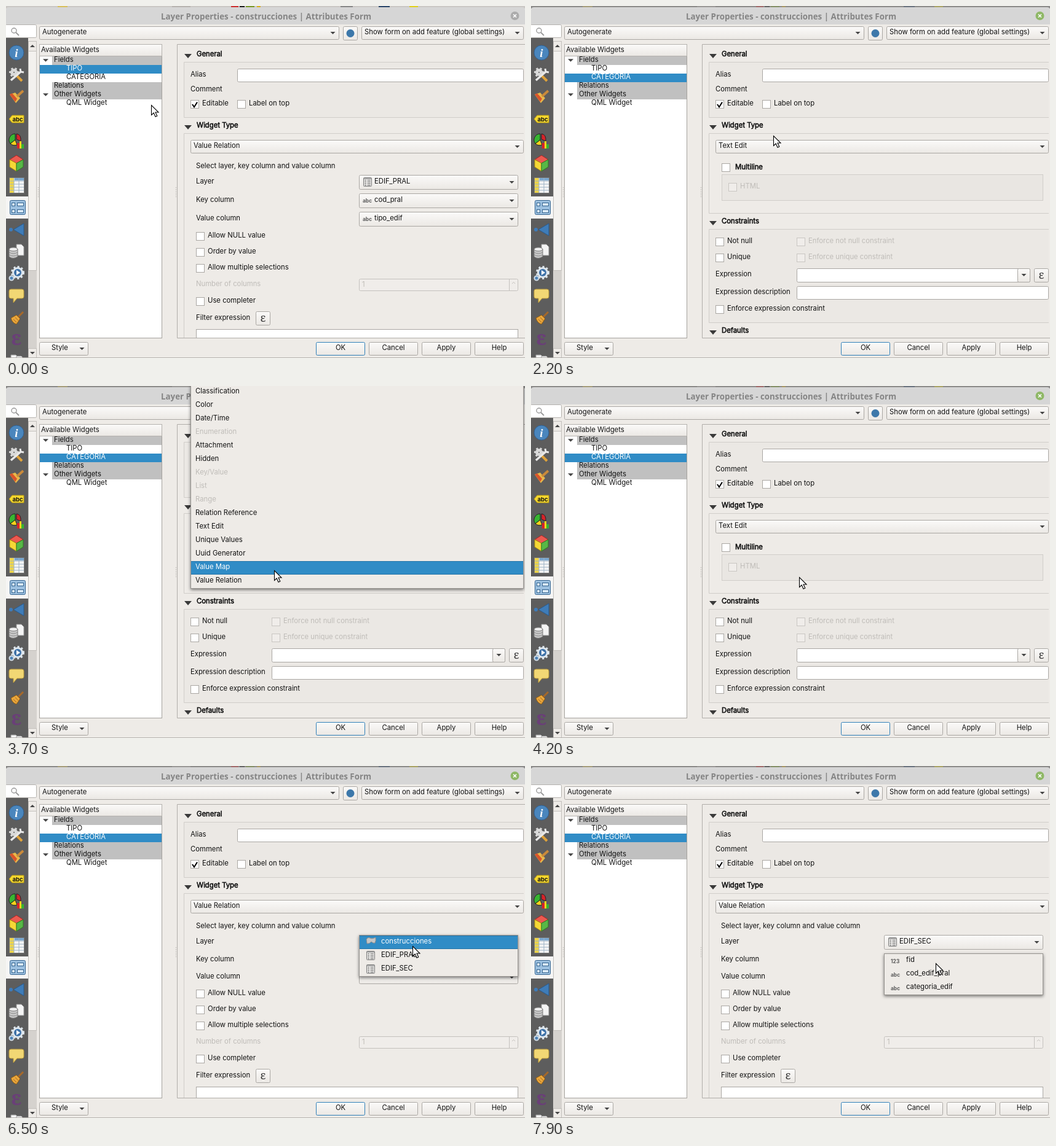
Write an HTML page that moves like this. It is 844 px wide and 573 px high and loops after 8000 ms.

```html
<!DOCTYPE html>
<html lang="en">
<head>
<meta charset="utf-8">
<title>Layer Properties</title>
<style>
  html, body { margin: 0; width: 100%; height: 100%; overflow: hidden; background: #eeebe7; }
  svg { display: block; width: 100vw; height: 100vh; }
  text { font: 11.3px Inter, sans-serif; fill: #111; white-space: pre; }
  .title { font: bold 13.33px "Noto Sans", sans-serif; fill: #858585; }
  .bold { stroke: #111; stroke-width: .55px; }
  .off { fill: #bfbcb8; }
  .sel { fill: #fff; }
  .mid { text-anchor: middle; }
  .type { font: bold 8.4px Inter, sans-serif; fill: #5c5c5c; }
  .eps { font: 18px "Noto Serif", serif; fill: #333; text-anchor: middle; }
  .item > .bar { visibility: hidden; }
  .item.on > .bar { visibility: visible; }
  .item.on > text { fill: #fff; }
  .menu { filter: drop-shadow(0 2px 2.5px rgba(0, 0, 0, .5)); }
</style>
</head>
<body>
<svg id="stage" viewBox="0 0 844 573" xmlns="http://www.w3.org/2000/svg"></svg>
<script>
const EDGE = '#aaa7a3', BLUE = '#308cc6', BG = '#eeebe7';

// Drawing helpers; text is placed by the vertical centre of its capitals.
const fill = (x, y, w, h, color, extra = '') =>
  `<rect x="${x}" y="${y}" width="${w}" height="${h}" fill="${color}" ${extra}/>`;
const box = (x, y, w, h, color = '#fff', edge = EDGE, r = 0) =>
  fill(x + .5, y + .5, w - 1, h - 1, color, `stroke="${edge}" rx="${r}"`);
const label = (x, y, s, cls = '') => `<text x="${x}" y="${y + 4}" class="${cls}">${s}</text>`;
const path = (d, color, extra = '') => `<path d="${d}" fill="${color}" ${extra}/>`;
const stroke = (d, color, w = 1) => path(d, 'none', `stroke="${color}" stroke-width="${w}"`);
const disc = (x, y, r, color, extra = '') => `<circle cx="${x}" cy="${y}" r="${r}" fill="${color}" ${extra}/>`;
const group = (id, body, extra = '') => `<g id="${id}" ${extra}>${body}</g>`;
const at = (x, y, body) => `<g transform="translate(${x} ${y})">${body}</g>`;
const arrow = (x, y, s = 4) => path(`M${x - s} ${y - s / 2}h${2 * s}l${-s} ${s}z`, '#444');

const button = (x, y, w, h, s = '', edge = EDGE) =>
  box(x, y, w, h, 'url(#face)', edge, 2) + label(x + w / 2, y + 9, s, 'mid');
const combo = (x, y, w, h, s = '', tx = x + 5) =>
  box(x, y, w, h, 'url(#face)', EDGE, 2) + label(tx, y + 9, s) + arrow(x + w - 10.5, y + h / 2);
const check = (x, y, s, cls = '') =>
  box(x, y, 14, 14, cls === 'off' ? '#f0edea' : '#fff', cls === 'off' ? '#c9c6c2' : '#aba8a4') +
  label(x + (x === 310 ? 22 : 19), y + 5, s, cls);
const section = (y, s, h) =>
  path(`M290 ${y}h12l-6 7z`, '#3a3a3a') + label(310, y - .5, s, 'bold') +
  (h ? path(`M844 ${y + 13.5}H289.5v${h}H844`, 'rgba(0,0,0,.012)', 'stroke="#d0cdc9"') : '');
const epsButton = (x, y) => button(x, y, 24, 23) + label(x + 12, y + 12.5, 'ε', 'eps');

const tableIcon = (x, y) => {
  let s = box(x, y, 14, 15, '#f2f1ef', '#777', 1) + fill(x + 1, y + 1, 12, 2, '#aaa');
  for (let i = 0; i < 4; i++) s += stroke(`M${x + 2} ${y + 4.5 + i * 2.7}h3m1.5 0h5.5`, '#777', 1.2);
  return s;
};
const landIcon = (x, y) =>
  path(`M${x} ${y + 3}q3-4 6-2t9-1q1 5-1 9-3 1-6-2-3 4-7 3z`, '#c6c6c6', 'stroke="#8c8c8c"');
const typeIcon = s => (x, y) => label(x - 1, y + 7.5, s, 'type');

const menu = (id, x, y, w, items) => {
  const rows = items.map(([s, icon, cls], i) => {
    const top = y + 1 + i * 22;
    return `<g class="item">${fill(x + 1, top, w - 2, 22, '#2675a8', 'class="bar"')}` +
      fill(x + 1, top + 1, w - 2, 20, BLUE, 'class="bar"') +
      (icon ? icon(x + 12, top + 3) : '') + label(icon ? x + 36 : x + 8, top + 9, s, cls) + '</g>';
  });
  return group(id, box(x, y, w, items.length * 22 + 2, BG, '#96938f') + rows.join(''), 'class="menu"');
};

// Form for a value relation; the tall version has taller key and value combos.
const relationForm = tall => {
  const d = tall ? 0 : -4, h = tall ? 24 : 22;
  const key = tall ? 315 : 314, val = tall ? 345 : 342;
  const keyTop = 305, valTop = tall ? 335 : 333;
  let s = combo(300, 218, 542, 22, 'Value Relation') +
    label(309, 260, 'Select layer, key column and value column') +
    label(309, 285, 'Layer') + label(309, key, 'Key column') + label(309, val, 'Value column') +
    combo(574, 275, 259, 24) + combo(574, keyTop, 259, h) + combo(574, valTop, 259, h);
  if (tall) s += tableIcon(581, 279) + label(599, 285, 'EDIF_PRAL') +
    label(580, 316, 'abc', 'type') + label(599, 315, 'cod_pral') +
    label(580, 346, 'abc', 'type') + label(599, 345, 'tipo_edif');
  const options = [['Allow NULL value', 368], ['Order by value', 394],
    ['Allow multiple selections', 420], ['Use completer', 474]];
  s += options.map(([name, y]) => check(309, y + d, name)).join('') +
    label(309, 452 + d, 'Number of columns', 'off') +
    box(574, 444 + d, 259, 20, '#f0edea', '#c4c1bd', 2) + label(579, 453 + d, '1', 'off') +
    stroke(`M818.5 ${444 + d}v20`, '#c4c1bd') + stroke(`M823 ${452 + d}l2.5-2.5 2.5 2.5`, '#c4c1bd') +
    label(309, 507 + d, 'Filter expression') + epsButton(406, 497 + d) + box(309, 526 + d, 524, 60);
  return path('M844 207.5H289.5V560', 'none', 'stroke="#d0cdc9"') + s;
};

const textForm = () =>
  path('M844 207.5H289.5V337.5H844', 'none', 'stroke="#d0cdc9"') +
  combo(300, 218, 542, 22, 'Text Edit') +
  check(310, 256, '') + label(332, 262, 'Multiline', 'bold') +
  box(310, 274, 523, 43, '#e9e6e2', '#d0cdc9') + check(321, 288, 'HTML', 'off') +
  section(350, 'Constraints', 152) +
  check(300, 377, 'Not null') + check(432, 377, 'Enforce not null constraint', 'off') +
  check(300, 403, 'Unique') + check(432, 403, 'Enforce unique constraint', 'off') +
  label(300, 436, 'Expression') + box(432, 427, 380, 23, '#fff', EDGE, 2) +
  box(791, 427, 21, 23, 'url(#face)', EDGE, 2) + arrow(801.5, 438) + epsButton(818, 427) +
  label(300, 465, 'Expression description') + box(432, 456, 410, 22, '#fff', EDGE, 2) +
  check(300, 487, 'Enforce expression constraint') + section(528, 'Defaults', 0);

const broom = (head, rod) =>
  stroke('M1 0L11-10', rod, 3) + path('M-9 0L0-5 6 1 0 10Q-7 8-9 0z', head, 'stroke="#8a5a14"') +
  stroke('M-5 2l5 5M-2-1l5 5', '#a66a1c');
const sheet = path('M0-12h8l4 4V6H0z', '#f4f4f4', 'stroke="#999"');
const gear = (r, color) => disc(0, 0, r, '#fff0', `stroke="${color}" stroke-width="5"`) +
  disc(0, 0, r + 3, 'none', `stroke="${color}" stroke-width="3" stroke-dasharray="3 3.3"`);

const sidebar = () => {
  const icons = [
    [76, disc(0, 0, 12, '#4a86bd', 'stroke="#2f5f90"') +
      `<text x="0" y="6.5" class="mid" style="font:italic bold 19px 'Liberation Serif',serif;fill:#fff">i</text>`],
    [112, at(-4, -4, gear(3.5, '#d9d9d9')) + stroke('M-1 0L9 10', '#e0a33a', 4) +
      stroke('M-9 9L8-6', '#e8e8e8', 3.5) + stroke('M6-10l1 5 5 1', '#e8e8e8', 3)],
    [148, path('M-11-4L-2-7 6 2-1 10z', '#e8b84a') + path('M-11-4l4-2 8 9-3 5z', '#d9542b') +
      stroke('M1-1L11-10', '#c98a3a', 4)],
    [184, path('M-12 0l5-6H12V6H-7z', '#f7d92f', 'stroke="#b89a13"') +
      `<text x="2" y="3.5" class="mid" style="font:bold 9.5px Inter,sans-serif">abc</text>`],
    [220, path('M-2-2V-12A10 10 0 0 0-10 4z', '#37b531', 'stroke="#222"') +
      path('M-2-2L-10 4A10 9 0 0 0 1 6z', '#f2d21c', 'stroke="#222"') +
      path('M0-3V-12Q8-11 7 0z', '#d8232a', 'stroke="#222"') +
      fill(1, 3, 4, 9, '#d8232a') + fill(5, 0, 3, 12, '#f2d21c') + fill(8, 5, 4, 7, '#37b531')],
    [256, path('M0-13L11-6 0 0-11-6z', '#eb5a50', 'stroke="#a22"') +
      path('M-11-6L0 0V13L-11 6z', '#f4d836', 'stroke="#a58a10"') +
      path('M11-6L0 0V13L11 6z', '#57b847', 'stroke="#2f7a22"')],
    [292, box(-12, -13, 25, 26, '#f5f5f5', '#777') + fill(-11, -12, 7, 24, '#f0d648') +
      fill(-3, -12, 15, 4, '#7aa7cf') + stroke('M-11-7H12M-11-2H12M-11 3H12M-11 8H12M-4-12V12M4-12V12', '#9fb4c6')],
    [328, box(-11, -12, 26, 24, '#9cc0e0', '#35648f', 2) +
      [[-8, -8], [-8, 3]].map(([x, y]) => box(x, y, 6, 6, '#d8e8f5', '#35648f') +
        box(x + 9, y, 11, 6, '#d8e8f5', '#35648f')).join('')],
    [364, path('M-5 0L12-10V10z', '#3f7cb8', 'stroke="#2a5a8c"') + disc(-9, 0, 3, '#3f7cb8')],
    [400, at(0, 0, sheet) + path('M-12-4v12q6 5 14 0V-4z', '#c9c9c9', 'stroke="#777"') +
      '<ellipse cx="-5" cy="-4" rx="7" ry="3" fill="#eee" stroke="#777"/>' + stroke('M-12 1q7 4 14 0M-12 5q7 4 14 0', '#888')],
    [436, at(2, -2, gear(6.5, '#dfe7ee') + disc(0, 0, 6, '#3f72a8') + path('M-2-4L4 0-2 4z', '#fff')) +
      at(-8, 7, disc(0, 0, 3.5, '#4f84b8', 'stroke="#cfdbe6" stroke-width="2"'))],
    [470, path('M-9-9H9q3 0 3 3V3q0 3-3 3H1L-5 13V6H-9q-3 0-3-3V-6q0-3 3-3z', '#f2d774', 'stroke="#b8983a"')],
    [508, broom('#e9a63c', '#a5682a')],
    [543, `<text y="9" class="mid" style="font:bold 32px 'Noto Serif',serif;fill:#6a3f78">ε</text>`],
    [578, at(-9, 2, sheet) + at(0, 4, sheet)]
  ];
  return fill(0, 52, 36, 521, '#5d5d5d') + fill(0, 310, 36, 36, '#f6f5f4') +
    icons.map(([y, s]) => at(17, y, s)).join('');
};

const specks = [[84, 16, '#d8c060'], [270, 30, '#b8b4b0'], [366, 12, '#c33'], [380, 8, '#222'], [390, 14, '#7a9a2a'],
  [408, 6, '#d8b020'], [544, 20, '#8a8a8a'], [606, 18, '#2f4a6c'], [656, 14, '#e0d020']];
const strip = (bg, alpha) => fill(0, 0, 844, 4, bg) +
  specks.map(([x, w, c]) => fill(x, 0, w, 2, c, `opacity="${alpha}"`)).join('');
const closeButton = color => disc(827.5, 16, 7, color) + stroke('M825 13.5l5 5m0-5l-5 5', '#fff', 1.6);

const tree = () => {
  const rows = [[78, 'Fields'], [98, 'TIPO'], [98, 'CATEGORIA'], [78, 'Relations'], [78, 'Other Widgets'], [98, 'QML Widget']];
  const chosen = (id, y, s) => group(id, fill(55, y, 198, 14, BLUE) + label(98, y + 5, s, 'sel'));
  return box(54, 62, 200, 479, '#fff', '#a5a29e') + box(54, 62, 200, 20, 'url(#face)', '#b5b2ae') +
    label(57, 71, 'Available Widgets') +
    fill(75, 82, 178, 14, '#c0c0c0') + fill(75, 124, 178, 28, '#c0c0c0') + arrow(64.5, 88.5, 4.5) + arrow(64.5, 144.5, 4.5) +
    rows.map(([x, s], i) => label(x, 87 + i * 14, s)).join('') +
    chosen('pickTipo', 96, 'TIPO') + chosen('pickCategoria', 110, 'CATEGORIA');
};

const dots = x => stroke(`M${x} 295v18`, '#b0ada9', 1.2).replace('/>', ' stroke-dasharray="1 2"/>');

const classes = ['Classification', 'Color', 'Date/Time', '-Enumeration', 'Attachment', 'Hidden', '-Key/Value', '-List',
  '-Range', 'Relation Reference', 'Text Edit', 'Unique Values', 'Uuid Generator', 'Value Map', 'Value Relation']
  .map(s => s[0] === '-' ? [s.slice(1), null, 'off'] : [s]);

stage.innerHTML = `<defs>
  <linearGradient id="face" x2="0" y2="1"><stop stop-color="#fbfaf9"/><stop offset="1" stop-color="#ebe8e4"/></linearGradient>
  <clipPath id="pane"><path d="M279 63H842V540H279z"/></clipPath></defs>` +
  fill(0, 0, 844, 573, BG) +
  group('stripIdle', strip('#cbc8c5', 1)) + group('stripActive', strip('#8d8c8b', .35)) +
  path('M0 30V7Q0 2 5 2H839Q844 2 844 7V30z', '#d6d6d6') +
  label(252, 17.5, 'Layer Properties - construcciones | Attributes Form', 'title') +
  group('closeIdle', closeButton('#acacac')) + group('closeActive', closeButton('#8fb866')) +
  sidebar() +
  box(-2, 30, 52, 22, '#fff', '#b5b2ae', 2) + disc(13, 40, 4, 'none', 'stroke="#999" stroke-width="1.4"') +
  stroke('M16 43l5 5', '#999', 1.8) +
  fill(36, 57, 14, 516, '#d5d2ce') + box(36, 57, 14, 17, BG, '#c2bfbb') + box(36, 73, 14, 358, '#f3f1ee', '#c2bfbb') +
  box(36, 557, 14, 16, BG, '#c2bfbb') + path('M39 67h8l-4-4z', '#444') + arrow(43, 565) +
  combo(54, 33, 488, 22, 'Autogenerate') + button(548, 33, 24, 23) + disc(560, 44.5, 6.5, '#3d78aa') +
  combo(578, 33, 264, 22, 'Show form on add feature (global settings)') +
  tree() + dots(52.5) + dots(276.5) +
  path('M844 62.5H278.5V540.5H844', 'none', 'stroke="#b0ada9"') +
  `<g clip-path="url(#pane)">` + section(78, 'General', 90) +
  label(300, 111, 'Alias') + box(376, 102, 466, 22, '#fff', EDGE, 2) + label(300, 135, 'Comment') +
  check(300, 153, 'Editable') + stroke('M303 160l3 4.5 5-8', '#000', 2) + check(376, 153, 'Label on top') +
  section(194, 'Widget Type', 0) +
  group('tipoForm', relationForm(true)) + group('textForm', textForm()) + group('categoriaForm', relationForm(false)) +
  group('layerValue', tableIcon(581, 279) + label(599, 285, 'EDIF_SEC')) + '</g>' +
  combo(54, 547, 80, 22, 'Style', 74) +
  button(504, 547, 80, 22, 'OK', '#2f7fb8') + button(590, 547, 80, 22, 'Cancel') +
  button(676, 547, 80, 22, 'Apply') + button(762, 547, 80, 22, 'Help') +
  fill(0, 572, 844, 1, '#b5b2ae') +
  menu('widgetMenu', 300, -2, 542, classes) +
  menu('layerMenu', 574, 275, 259, [['construcciones', landIcon], ['EDIF_PRAL', tableIcon], ['EDIF_SEC', tableIcon]]) +
  menu('keyMenu', 574, 305, 259, [['fid', typeIcon('123')], ['cod_edif_pral', typeIcon('abc')], ['categoria_edif', typeIcon('abc')]]) +
  group('pointer', path('M.5.5V16.5L4.2 13 7 19.2 9.8 18 7 12H12z', '#fff', 'stroke="#000" stroke-width="1.1"'));

const byId = id => document.getElementById(id);

// Visible spans in ms: [from, to).
const spans = {
  stripIdle: [0, 1000], closeIdle: [0, 1000], stripActive: [1000, 8000], closeActive: [1000, 8000],
  pickTipo: [0, 1000], pickCategoria: [1000, 8000],
  tipoForm: [0, 1100], textForm: [1100, 4300], categoriaForm: [4300, 8000],
  widgetMenu: [2900, 4200], layerMenu: [5700, 7300], layerValue: [7400, 8000], keyMenu: [7900, 8000]
};

// Pointer tip: time, x, y.
const track = [[0, 236, 161], [800, 156, 112], [1500, 156, 112], [2400, 428, 225], [2800, 428, 225], [2900, 434, 225],
  [3300, 434, 225], [3700, 436, 300], [3900, 436, 311], [4500, 436, 314], [5200, 645, 300], [5400, 660, 285],
  [5500, 662, 282], [6400, 662, 282], [6500, 661, 293], [7000, 658, 324], [7600, 658, 324], [7700, 658, 321], [8000, 658, 321]];
track[9][2] = track[8][2];

function pointerAt(t) {
  const i = track.findIndex(p => p[0] > t);
  const [t0, x0, y0] = track[i - 1], [t1, x1, y1] = track[i];
  const k = (t - t0) / (t1 - t0), e = k * k * (3 - 2 * k);
  return [Math.round(x0 + (x1 - x0) * e), Math.round(y0 + (y1 - y0) * e)];
}

function highlight(id, top, y) {
  const row = Math.floor((y - top) / 22);
  byId(id).querySelectorAll('.item').forEach((item, i) => item.classList.toggle('on', i === row));
}

function draw() {
  const t = Math.floor(performance.now() % 8000 / 100) * 100;
  for (const [id, [from, to]] of Object.entries(spans)) byId(id).style.display = t >= from && t < to ? '' : 'none';
  const [x, y] = pointerAt(t);
  byId('pointer').setAttribute('transform', `translate(${x} ${y})`);
  highlight('widgetMenu', -1, y);
  highlight('layerMenu', 276, y);
  requestAnimationFrame(draw);
}
draw();
</script>
</body>
</html>
```
